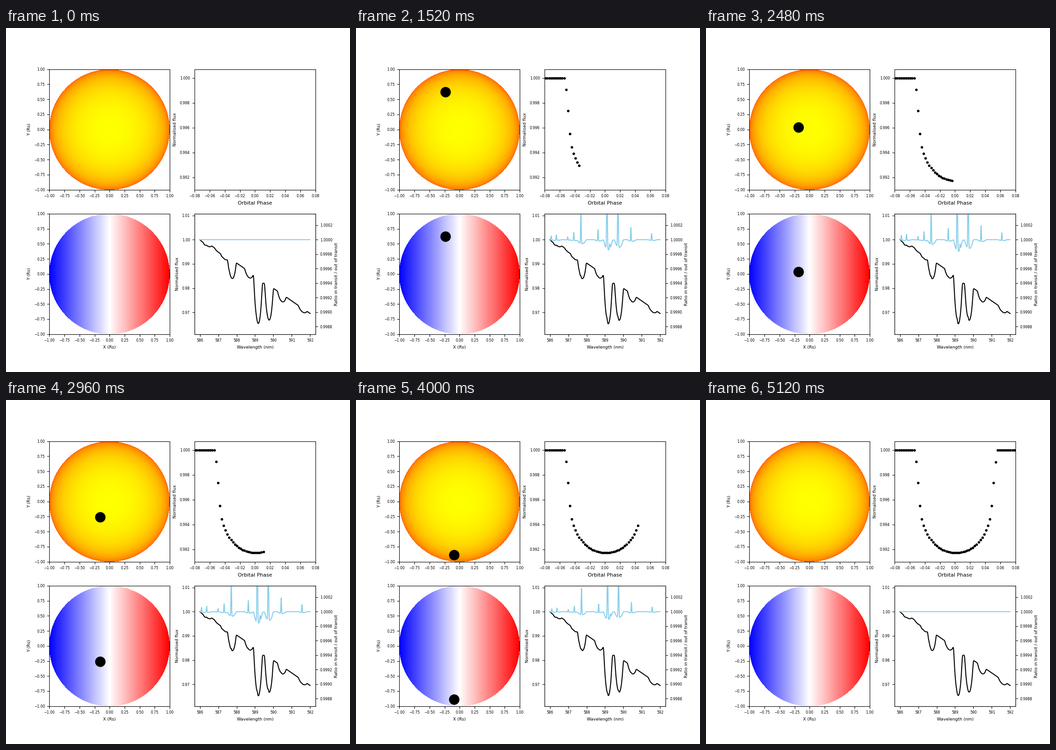
These frames come from a looping animation (748x748 px, 5.2 s). A matplotlib script:

```python
import numpy as np
import matplotlib.pyplot as plt
from matplotlib.animation import FuncAnimation
from matplotlib.patches import Circle
from matplotlib.ticker import ScalarFormatter

FRAMES, INTERVAL = 65, 80
MID, STEP = 32, 0.0025                 # mid-transit frame, phase per frame
ORBIT, IMPACT = 3.15, 0.178            # in stellar radii
TILT = np.radians(84.7)                # spin-orbit angle
RADIUS = 0.0823
LIMB = 0.47, 0.2                       # quadratic limb darkening
SPIN = 0.22                            # rotation shift at the limb, nm
SLOPE = 0.0052                         # continuum drop per nm
SMALL, TICK = 6.66, 5.55

# Absorption lines before rotation: wavelength, depth, width
LINES = [(586.12, 0.008, 0.016), (586.40, 0.010, 0.016),
         (587.02, 0.006, 0.016), (587.35, 0.015, 0.016),
         (587.74, 0.064, 0.016), (588.67, 0.021, 0.016),
         (589.158, 0.122, 0.02), (589.31, 0.009, 0.016),
         (589.756, 0.097, 0.02), (590.46, 0.026, 0.016),
         (591.59, 0.013, 0.016)]

plt.rcParams.update({
    "font.family": "DejaVu Sans", "font.size": 8,
    "xtick.labelsize": TICK, "ytick.labelsize": TICK,
})


def planet(n):
    """Sky position of the planet centre."""
    a = 2 * np.pi * STEP * (n - MID)
    along, across = ORBIT * np.sin(a), IMPACT * np.cos(a)
    s, c = np.sin(TILT), np.cos(TILT)
    return along * c - across * s, -along * s - across * c


def brightness(r2):
    """Limb-darkened intensity, zero off the disc."""
    k = 1 - np.sqrt(np.clip(1 - r2, 0, 1))
    return np.where(r2 > 1, 0, 1 - LIMB[0] * k - LIMB[1] * k * k)


def blocked(n):
    """Share of the starlight hidden by the planet."""
    x, y = planet(n)
    r = RADIUS * np.sqrt((np.arange(40) + 0.5) / 40)
    t = np.linspace(0, 2 * np.pi, 120, endpoint=False)[:, None]
    spot = brightness((x + r * np.cos(t)) ** 2 + (y + r * np.sin(t)) ** 2)
    return RADIUS ** 2 * spot.mean() / (1 - LIMB[0] / 3 - LIMB[1] / 6)


def local(shift=0.0):
    """Spectrum of one patch of the star."""
    return 1 - sum(d * np.exp(-0.5 * ((wave - w - shift) / s) ** 2)
                   for w, d, s in LINES)


# Rotation smears the local lines over the whole disc
wave = np.linspace(586, 592, 1501)
u = np.arange(-0.23, 0.231, wave[1] - wave[0]) / 0.23
kernel = np.clip(1 - u * u, 0, None) ** 0.75
smear = np.convolve(local() - 1, kernel / kernel.sum(), "same") + 1
base = smear / smear[0] * (1 - SLOPE * (wave - 586))

steps = np.arange(FRAMES)
phase = (steps - MID) * STEP + 0.001
depth = np.array([blocked(n) for n in steps])


def ratio(n):
    """In-transit spectrum divided by the out-of-transit one."""
    patch = local(SPIN * planet(n)[0])
    return (1 - depth[n] * patch / smear) / (1 - depth[n])


fig, ((star, curve), (velo, spec)) = plt.subplots(
    2, 2, figsize=(7.48, 7.48), dpi=100)
fig.subplots_adjust(left=0.125, right=0.9, bottom=0.11, top=0.88,
                    wspace=0.2, hspace=0.2)

# Stellar disc: limb darkening above, rotation velocity below
grid = (np.arange(262) + 0.5) / 131 - 1
gx, gy = np.meshgrid(grid, grid)
r2 = gx ** 2 + gy ** 2
discs = []
for ax, data, cmap, low in ((star, brightness(r2), "autumn", 0),
                            (velo, gx, "bwr", -1)):
    ax.imshow(np.ma.masked_where(r2 > 1, data), cmap=cmap, vmin=low, vmax=1,
              extent=(-1, 1, -1, 1), origin="lower", interpolation="nearest")
    ax.set_xticks(np.arange(-1, 1.1, 0.25))
    ax.set_yticks(np.arange(-1, 1.1, 0.25))
    ax.set_ylabel("Y (Rs)", fontsize=SMALL)
    discs.append(ax.add_patch(Circle((0, 3), RADIUS, color="black", lw=0.8)))
velo.set_xlabel("X (Rs)", fontsize=SMALL)

dots, = curve.plot([], [], "k.", markersize=6)
curve.set_xlim(-0.08, 0.08)
curve.set_ylim(0.991, 1.0007)
curve.set_xticks(np.linspace(-0.08, 0.08, 9))
curve.set_yticks(np.linspace(0.992, 1, 5))
curve.set_xlabel("Orbital Phase", fontsize=8)
curve.set_ylabel("Normalised flux", fontsize=SMALL)

flux_line, = spec.plot(wave, base, "k", lw=1.5)
spec.set_xlim(585.7, 592.3)
spec.set_ylim(0.961, 1.0107)
spec.set_yticks(np.linspace(0.97, 1.01, 5))
spec.set_xticks(range(586, 593))
spec.set_xlabel("Wavelength (nm)", fontsize=SMALL)
spec.set_ylabel("Normalised flux", fontsize=SMALL)

twin = spec.twinx()
ratio_line, = twin.plot(wave, np.ones_like(wave), color="skyblue", lw=1.5)
twin.set_ylim(0.998697, 1.000357)
twin.set_yticks(np.linspace(0.9988, 1.0002, 8))
twin.set_ylabel("Ratio in transit / out of transit", fontsize=SMALL,
                labelpad=2.5)
for ax in (curve, twin):
    ax.yaxis.set_major_formatter(ScalarFormatter(useOffset=False))


def update(n):
    for disc in discs:
        disc.center = planet(n)
    dots.set_data(phase[:n], 1 - depth[:n])
    rel = ratio(n)
    ratio_line.set_data(wave, rel)
    flux_line.set_data(wave, base * rel)
    return [*discs, dots, ratio_line, flux_line]


anim = FuncAnimation(fig, update, frames=FRAMES, interval=INTERVAL,
                     repeat=True, repeat_delay=0)
plt.show()
```
